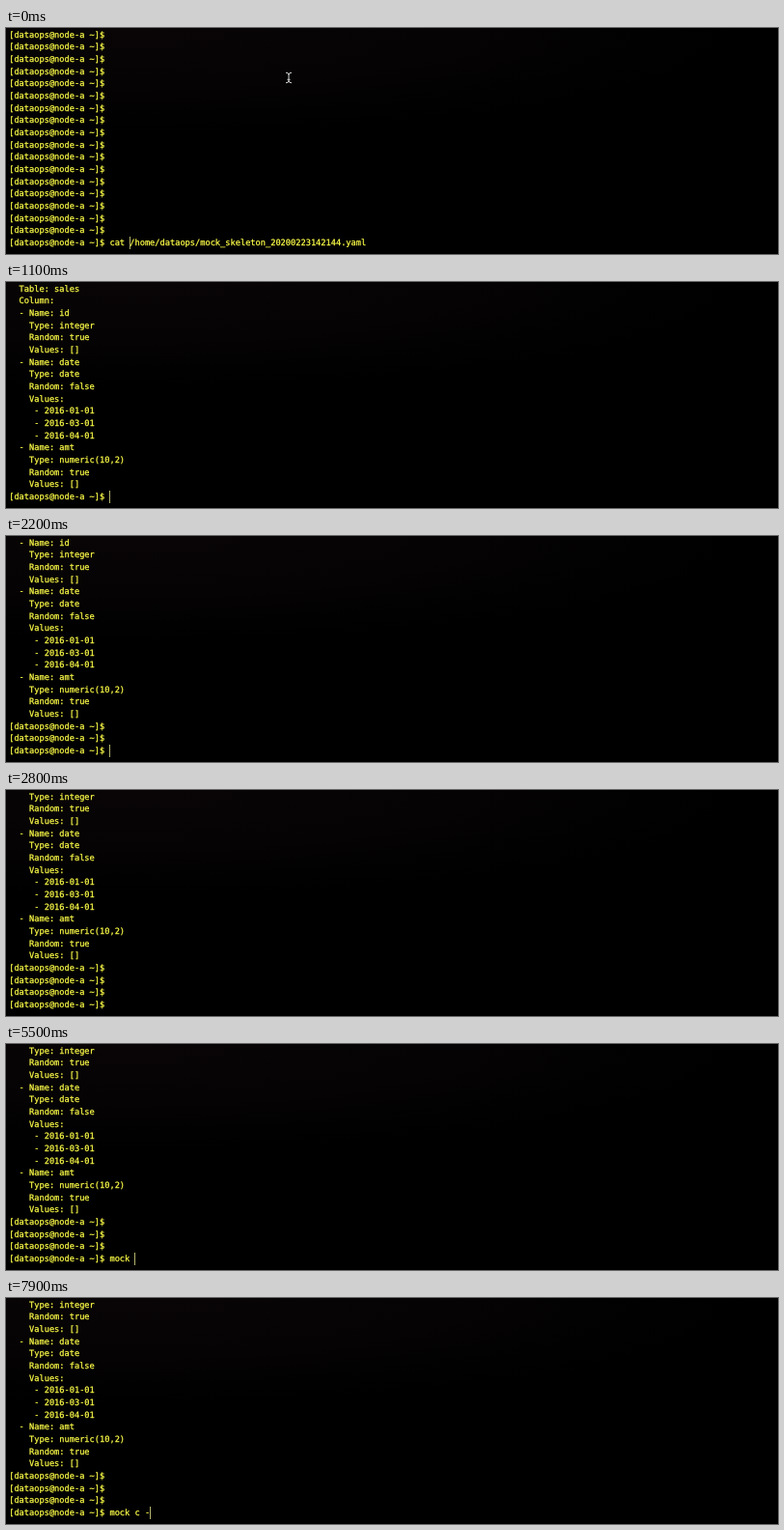
An HTML page that plays this animation: 800 px wide and 234 px high, repeating every 8 s.

```html
<!DOCTYPE html>
<html lang="en">
<head>
<meta charset="utf-8">
<title>Terminal session</title>
<style>
  html, body { margin: 0; width: 100%; height: 100%; overflow: hidden; background: #000; }
  #stage {
    position: relative; width: 800px; height: 234px; overflow: hidden;
    background: radial-gradient(ellipse 640px 110px at 130px 0, #090506, #050304 55%, #000) #000;
  }
  #screen {
    position: absolute; left: 3.2px; top: 1.7px; margin: 0;
    font: 8.66px/12.67px "DejaVu Sans Mono", monospace;
    font-variant-ligatures: none;
    text-rendering: geometricPrecision;
    white-space: pre; color: #ffff48;
    -webkit-text-stroke: .25px #ffff48;
  }
  #caret { position: absolute; top: 216px; width: 1px; height: 13px; background: #b4b46c; }
  #pointer { position: absolute; left: 288px; top: 45px; }
</style>
</head>
<body>
<div id="stage">
  <pre id="screen"></pre>
  <div id="caret"></div>
  <svg id="pointer" width="10" height="13" fill="none" stroke="#d4d4d4" stroke-width="1">
    <path d="M2 1.2Q5 1.2 5 3.4Q5 1.2 8 1.2M5 3V10M2 11.8Q5 11.8 5 9.6Q5 11.8 8 11.8M3.5 8.3H6.5"/>
  </svg>
</div>
<script>
const LOOP = 8000, ROWS = 18, CELL = 5.21, LEFT = 3.2;
const PROMPT = "[dataops@node-a ~]$ ";
const COMMAND = "cat /home/dataops/mock_skeleton_20200223142144.yaml";
const OUTPUT = `  Table: sales
  Column:
  - Name: id
    Type: integer
    Random: true
    Values: []
  - Name: date
    Type: date
    Random: false
    Values:
     - 2016-01-01
     - 2016-03-01
     - 2016-04-01
  - Name: amt
    Type: numeric(10,2)
    Random: true
    Values: []`.split("\n");

// start ms, prompts below the output, typed text, caret visible
const STEPS = [
  [1100, 1, "", true],
  [1900, 2, "", false],
  [2000, 2, "", true],
  [2100, 3, "", false],
  [2200, 3, "", true],
  [2500, 3, "", false],
  [2800, 4, "", false],
  [2900, 4, "", true],
  [3500, 4, "", false],
  [4000, 4, "", true],
  [4500, 4, "m", true],
  [5200, 4, "mo", true],
  [5300, 4, "mock", true],
  [5500, 4, "mock ", true],
  [6000, 4, "mock ", false],
  [6500, 4, "mock ", true],
  [7200, 4, "mock c", true],
  [7300, 4, "mock c ", true],
  [7500, 4, "mock c -", true]
];

const [screen, caret, pointer] =
  ["screen", "caret", "pointer"].map(id => document.getElementById(id));
const prompts = n => Array(n).fill(PROMPT);

function stateAt(t) {
  if (t < STEPS[0][0]) {
    // the caret walks right through the command, five cells per tick
    const col = Math.min(4 + 5 * Math.floor(t / 100), COMMAND.length);
    return { lines: prompts(ROWS), typed: COMMAND, col, on: true, mouse: true };
  }
  const [, count, typed, on] = STEPS.findLast(s => s[0] <= t);
  return { lines: [...OUTPUT, ...prompts(count)], typed, col: typed.length, on, mouse: false };
}

function draw(t) {
  const s = stateAt(t);
  const text = s.lines.slice(-ROWS).join("\n") + s.typed;
  if (screen.textContent !== text) screen.textContent = text;
  caret.style.left = Math.floor(LEFT + (PROMPT.length + s.col) * CELL) + "px";
  caret.style.visibility = s.on ? "visible" : "hidden";
  pointer.style.visibility = s.mouse ? "visible" : "hidden";
}

const start = performance.now();
function tick() {
  draw((performance.now() - start) % LOOP);
  requestAnimationFrame(tick);
}
tick();
</script>
</body>
</html>
```
